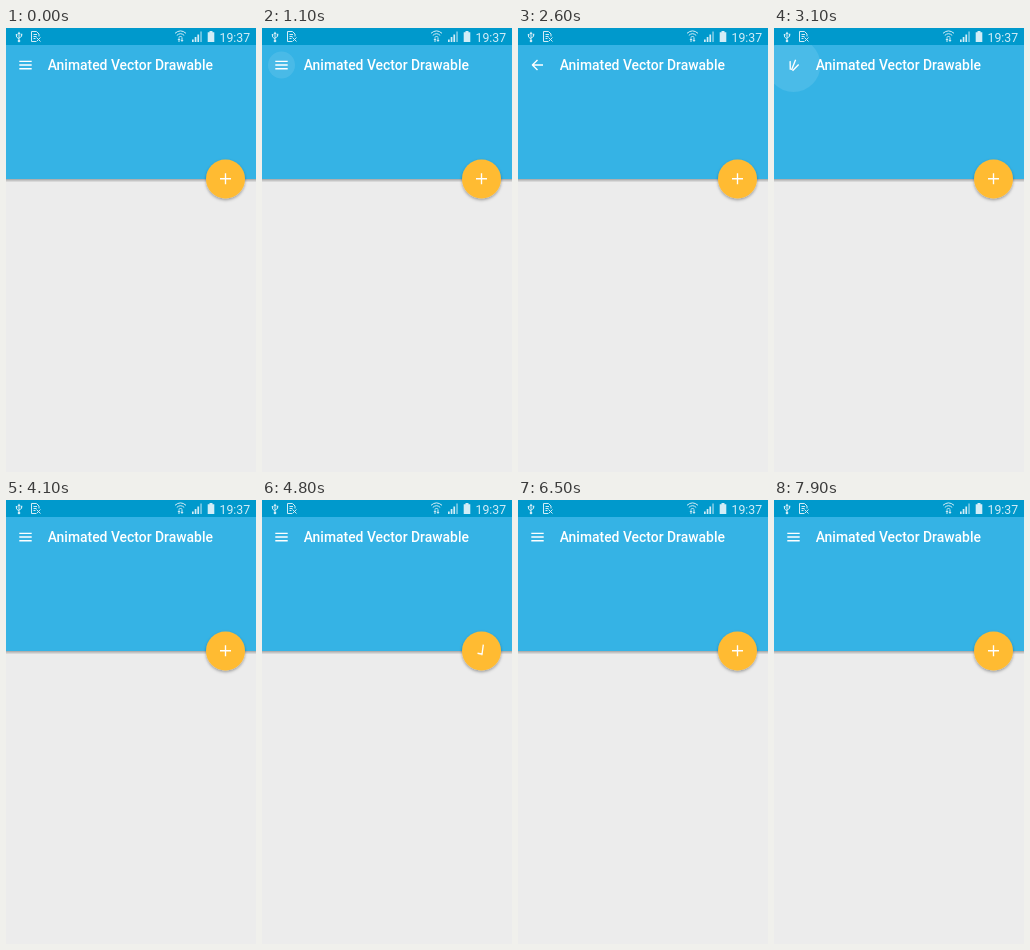
Animation, 250 px wide and 444 px high, one loop 8 s. Source, as an HTML page:

```html
<!DOCTYPE html>
<html lang="en">
<head>
<meta charset="utf-8">
<title>Animated Vector Drawable</title>
<style>
  html, body { margin: 0; height: 100%; overflow: hidden; background: #ececec; }
  svg { display: block; width: 100%; height: 100%; }
  text { font-family: Roboto, sans-serif; fill: #fff; }
  .line { fill: none; stroke: #fff; stroke-width: 1.35; }
  .status { fill: none; stroke: #d3edf7; stroke-width: 1; }
  .solid { fill: #d3edf7; stroke: none; }
</style>
</head>
<body>
<svg viewBox="0 0 250 444">
  <defs>
    <linearGradient id="edge" x2="0" y2="1">
      <stop stop-color="#000" stop-opacity=".3"/>
      <stop offset="1" stop-color="#000" stop-opacity="0"/>
    </linearGradient>
    <filter id="lift" x="-30%" y="-30%" width="160%" height="170%">
      <feDropShadow dx="0" dy="1.5" stdDeviation="1.5" flood-opacity=".35"/>
    </filter>
    <clipPath id="below"><path d="M0 17H250V151H0z"/></clipPath>
  </defs>

  <rect width="250" height="444" fill="#ececec"/>
  <rect y="151" width="250" height="3.5" fill="url(#edge)"/>
  <rect width="250" height="151" fill="#35b3e5"/>
  <rect width="250" height="17" fill="#0099cc"/>

  <g class="status">
    <!-- USB -->
    <path d="M13 5V13M10.5 7V9L13 11M15.5 6.5V8.5L13 10"/>
    <path class="solid" d="M11.5 6L13 3.5L14.5 6zM9.8 6h1.6v1.6H9.8zM14.7 5.8h1.6v1.6h-1.6z"/>
    <circle class="solid" cx="13" cy="13" r="1.3"/>
    <!-- Card with a cross -->
    <path d="M30 13.5H25.5V3.5H30.5L33 6V8.5M27.5 6.5H31M27.5 8.5H30.5M27.5 10.5H29.5M30.5 9.5L34.5 13.5M34.5 9.5L30.5 13.5"/>
    <!-- Wi-Fi and transfer arrows -->
    <path d="M169 5.3Q174.5 .5 180 5.3M170.8 7.4Q174.5 4 178.2 7.4M172.6 9.3Q174.5 7.7 176.4 9.3"/>
    <path class="solid" d="M171.5 12L173 10L174.5 12H173.5V14H172.5V12zM174.5 12L176 14L177.5 12H176.5V10H175.5V12z"/>
    <!-- Signal -->
    <path class="solid" d="M186 11.5h1.7V14H186zM188.7 9h1.7v5h-1.7zM191.4 6.5h1.7V14h-1.7z"/>
    <path class="solid" opacity=".5" d="M194.1 3.5h1.9V14h-1.9z"/>
    <!-- Battery -->
    <path class="solid" d="M203.5 3h3v1.2H208.3V14H201.7V4.2H203.5z"/>
  </g>
  <text x="213.5" y="13.6" font-size="12.3" style="fill:#d3edf7">19:37</text>

  <g clip-path="url(#below)">
    <circle id="menuRipple" cx="19.5" cy="37" fill="#fff"/>
  </g>
  <path id="menu" class="line"/>
  <text x="41.7" y="42" font-size="13.9" font-weight="500">Animated Vector Drawable</text>

  <circle cx="219.5" cy="151" r="19.5" fill="#ffbb33" filter="url(#lift)"/>
  <circle id="fabRipple" cx="219.5" cy="151" fill="#000"/>
  <path id="fab" class="line"/>
</svg>
<script>
  const LOOP = 8000, STEP = 100;
  const byId = id => document.getElementById(id);
  const progress = (t, start, length) => Math.min(1, Math.max(0, (t - start) / length));
  const ease = p => (1 - Math.cos(Math.PI * p)) / 2;

  // Each segment is [x1, y1, x2, y2] around the icon centre.
  const burger = [[-6.2, -3.7, 6.2, -3.7], [-6.2, 0, 6.2, 0], [-6.2, 3.7, 6.2, 3.7]];
  const arrow = [[0, -5.1, 5.4, .3], [-5.5, 0, 5, 0], [0, 5.1, 5.4, -.3]];
  const plus = [[0, 5.5, 0, -5.5], [5.5, 0, -5.5, 0]];
  const check = [[-4.5, 5, 1.5, -4.2], [4.5, -1, 1.3, -4.1]];

  function morph(id, from, to, p, x, y) {
    const path = byId(id);
    const points = from.map((line, i) => line.map((v, j) => v + (to[i][j] - v) * p));
    path.setAttribute("d", points.map(([a, b, c, d]) => `M${a} ${b}L${c} ${d}`).join(""));
    path.setAttribute("transform", `translate(${x} ${y}) rotate(${180 * p})`);
  }

  function ripple(id, age, radius, alpha, grow, hold, fade) {
    const circle = byId(id);
    const growth = progress(age, 0, grow);
    circle.setAttribute("r", radius * Math.sqrt(growth));
    circle.setAttribute("opacity", alpha * (1 - progress(age, hold, fade)));
  }

  function draw(now) {
    const t = Math.floor((now % LOOP) / STEP) * STEP;

    const menuOpen = ease(progress(t, 1280, 520)) - ease(progress(t, 2880, 520));
    morph("menu", burger, arrow, menuOpen, 19.5, 37);
    ripple("menuRipple", t - (t < 2600 ? 1000 : 2600), 27, .1, 400, 500, 300);

    const checked = ease(progress(t, 4490, 400)) - ease(progress(t, 5990, 400));
    morph("fab", plus, check, checked, 219.5, 150.7);
    ripple("fabRipple", t - (t < 5700 ? 4200 : 5700), 19.5, .08, 250, 300, 300);

    requestAnimationFrame(draw);
  }
  draw(0);
</script>
</body>
</html>
```
